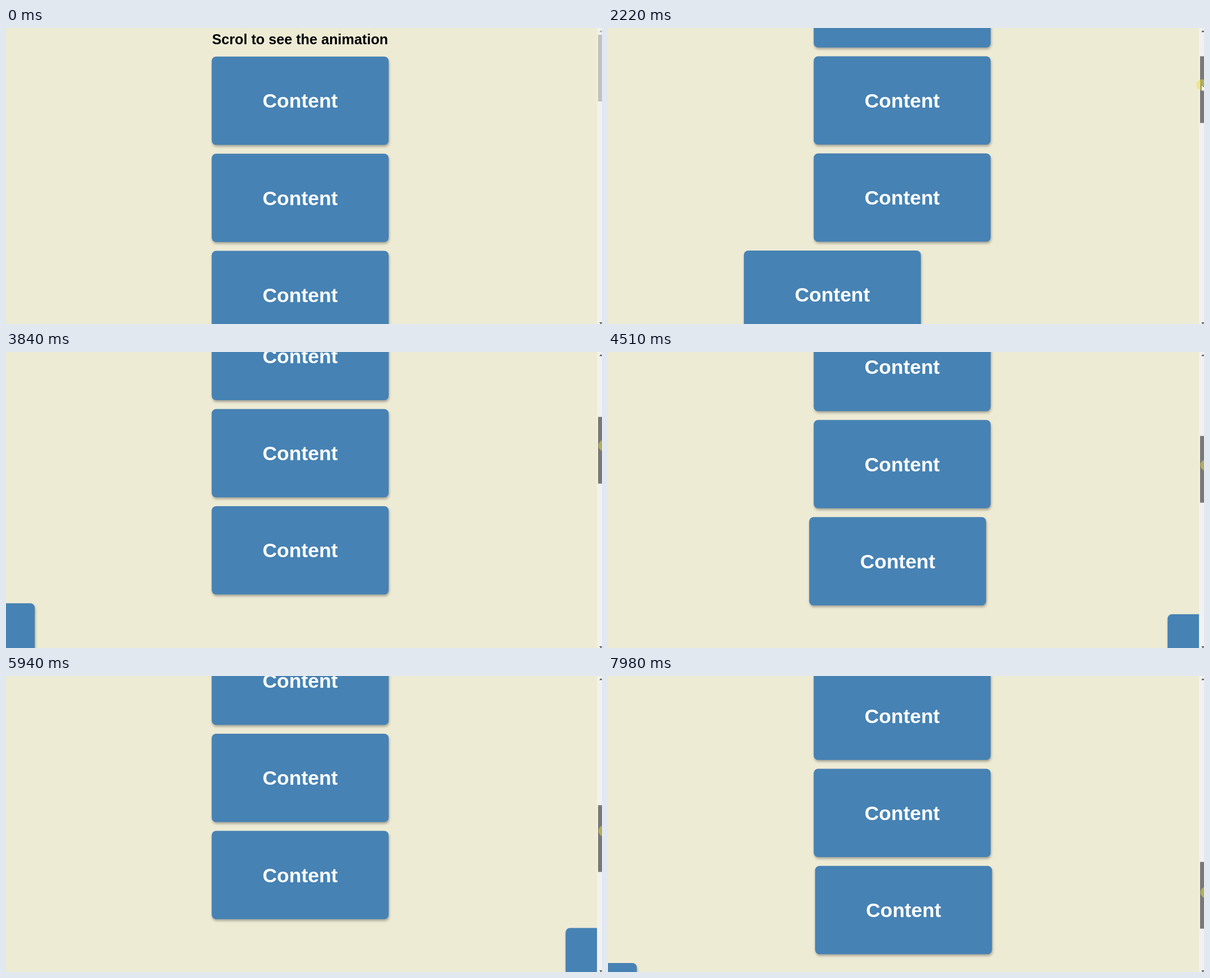
Animation, 1061 px wide and 528 px high, one loop 8000 ms. Source, as an HTML page:

```html
<!DOCTYPE html>
<html lang="en">
<head>
<meta charset="utf-8">
<title>Scroll animation</title>
<style>
  html, body { margin: 0; width: 100%; height: 100%; overflow: hidden; background: #eeebd5; }
  svg { display: block; width: 1061px; height: 528px; }
  text { font-family: "Liberation Sans", Arial, sans-serif; font-weight: bold; text-anchor: middle; }
  .title { font-size: 25.2px; fill: #000; }
  .box rect { fill: #4682b4; filter: drop-shadow(1.6px 3.15px 1.97px rgba(0, 0, 0, .3)); }
  .box text { font-size: 35.44px; fill: #fff; }
</style>
</head>
<body>
<svg viewBox="0 0 1061 528">
  <defs><clipPath id="view"><rect width="1052.3" height="528"/></clipPath></defs>
  <rect width="1061" height="528" fill="#eeebd5"/>
  <g clip-path="url(#view)">
    <g id="page"><text class="title" x="523.4" y="29">Scrol to see the animation</text></g>
  </g>
  <rect x="1052.3" width="14" height="528" fill="#f1f1f1"/>
  <path id="up" d="M1056.2 7.2h5.6l-2.8-3.2z"/>
  <path d="M1056.2 525h5.6l-2.8 3.2z" fill="#505050"/>
  <rect id="thumb" x="1054" width="10" height="119"/>
  <g id="mouse">
    <circle r="10" fill="#ebe13c" fill-opacity=".5"/>
    <path d="M-1 0v12l2.7-2.6 2 4.6 2-.9-2-4.5h3.8z" fill="#fff" stroke="#444" stroke-width=".5"/>
  </g>
</svg>
<script>
const LOOP = 8000, SLIDE = 650, COUNT = 13;
const TOP = 51, PITCH = 173.25, LEFT = 366.2, WIDTH = 315, HEIGHT = 157.5;
const TRIGGER = 528 * 0.8, PRESS = 1340;

// [first redraw, last redraw, redraws]
const bursts = [
  [70, 810, 11], [880, 1140, 5], [1340, 2110, 12], [2220, 2970, 12], [3030, 3780, 11],
  [3840, 4580, 11], [4650, 5450, 13], [5550, 6270, 11], [6360, 7150, 12], [7220, 7980, 12]
];
// [time, scroll offset]
const scrollKeys = [
  [0, 0], [1270, 0], [1895, 148.4], [2220, 173.7], [2902, 287.5], [3840, 469], [5183, 779],
  [5260, 842], [6270, 1068], [6719, 1156], [7384, 1361.2], [7980, 1444.8], [8000, 1444.8]
];
// [time, x, y] of the pointer
const mouseKeys = [
  [0, 1080, 497], [70, 1066, 496], [200, 1055, 440], [500, 1056, 230], [810, 1065, 90],
  [1140, 1067, 70], [1340, 1066, 66], [2220, 1057.5, 101.5], [2902, 1061, 126.5],
  [3840, 1064.5, 167], [5183, 1064.5, 237], [6719, 1064.5, 320], [7980, 1064.5, 386], [8000, 1064.5, 386]
];

const $ = id => document.getElementById(id);

// Linear lookup of column `to` by column `from`
function lookup(keys, v, from, to) {
  let i = 1;
  while (i < keys.length - 1 && keys[i][from] < v) i++;
  const a = keys[i - 1], b = keys[i];
  const u = (v - a[from]) / (b[from] - a[from] || 1);
  return a[to] + (b[to] - a[to]) * Math.min(1, Math.max(0, u));
}

// CSS "ease": cubic-bezier(.25, .1, .25, 1)
function ease(x) {
  if (x <= 0) return 0;
  if (x >= 1) return 1;
  const curve = (s, p, q) => 3 * (1 - s) * (1 - s) * s * p + 3 * (1 - s) * s * s * q + s * s * s;
  let lo = 0, hi = 1;
  for (let i = 0; i < 24; i++) {
    const mid = (lo + hi) / 2;
    if (curve(mid, 0.25, 0.25) < x) lo = mid; else hi = mid;
  }
  return curve(lo, 0.1, 1);
}

// Time of the latest redraw
function held(t) {
  let last = 0;
  for (const [start, end, n] of bursts) {
    if (t < start) break;
    const step = (end - start) / (n - 1);
    last = start + step * Math.min(n - 1, Math.floor((t - start) / step + 1e-6));
  }
  return last;
}

function make(tag, attrs, parent) {
  const el = document.createElementNS("http://www.w3.org/2000/svg", tag);
  for (const k in attrs) el.setAttribute(k, attrs[k]);
  return parent.appendChild(el);
}

const boxes = Array.from({ length: COUNT }, (_, i) => {
  const y = TOP + i * PITCH;
  const el = make("g", { class: "box" }, $("page"));
  make("rect", { width: WIDTH, height: HEIGHT, rx: 7.9 }, el);
  make("text", { x: WIDTH / 2, y: 91.4 }, el).textContent = "Content";
  const start = y < TRIGGER ? -SLIDE : lookup(scrollKeys, y - TRIGGER, 1, 0);
  return { el, y, start, side: i % 2 ? -1 : 1 };
});

function draw(now) {
  const t = held(now % LOOP);
  const scroll = lookup(scrollKeys, t, 0, 1);
  const mx = lookup(mouseKeys, t, 0, 1), my = lookup(mouseKeys, t, 0, 2);

  $("page").setAttribute("transform", `translate(0 ${-scroll})`);
  for (const b of boxes) {
    const shift = b.side * 2 * WIDTH * (1 - ease((t - b.start) / SLIDE));
    b.el.setAttribute("transform", `translate(${LEFT + shift} ${b.y})`);
  }
  $("up").setAttribute("fill", scroll > 0 ? "#505050" : "#a3a3a3");
  $("thumb").setAttribute("y", 12 + scroll / 4.52);
  $("thumb").setAttribute("fill", t >= PRESS ? "#787878" : my < 131 ? "#a8a8a8" : "#c1c1c1");
  $("mouse").setAttribute("transform", `translate(${mx} ${my})`);
}

const begin = performance.now();
function tick() {
  draw(performance.now() - begin);
  requestAnimationFrame(tick);
}
tick();
</script>
</body>
</html>
```
